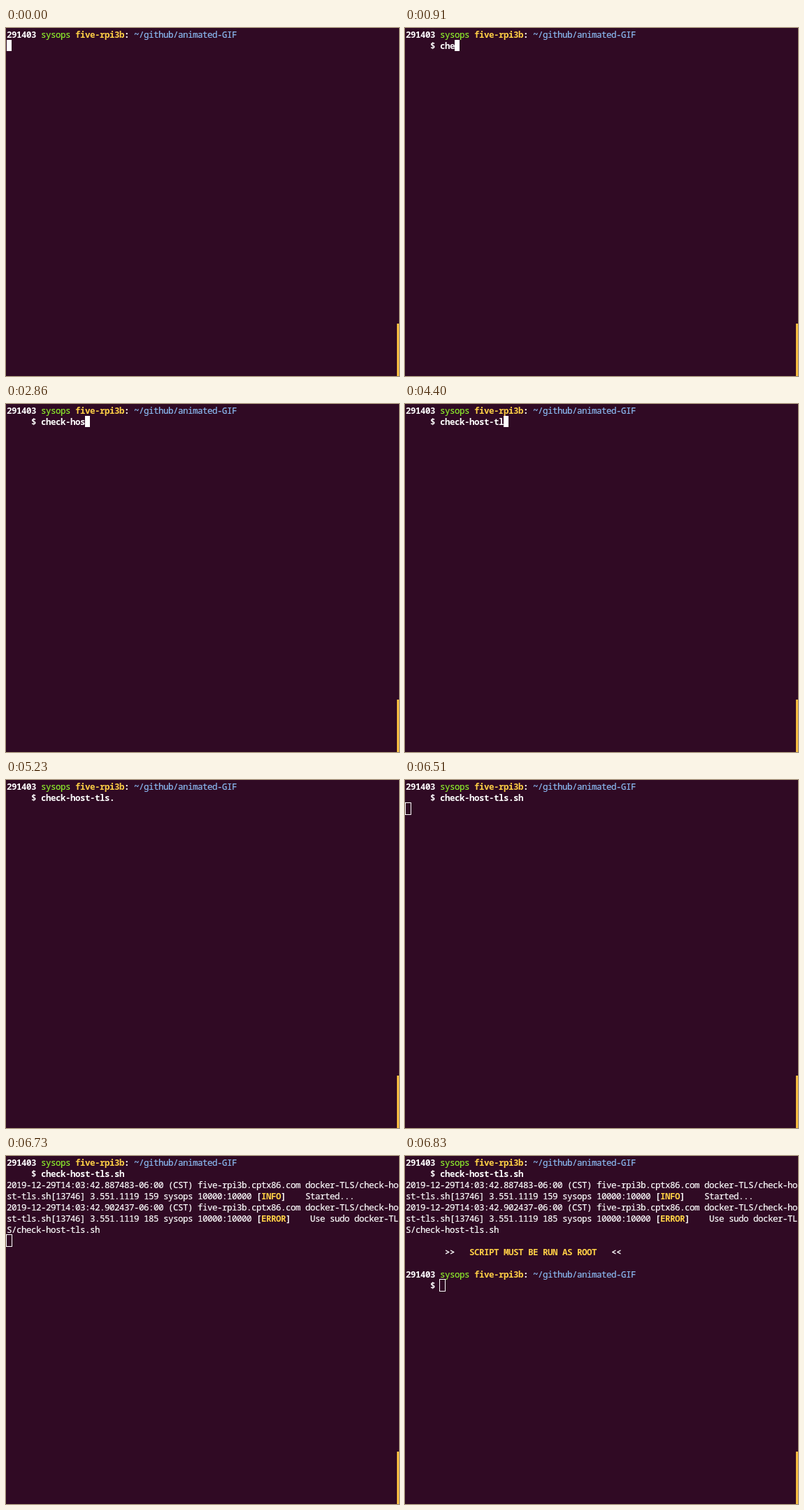
Animation of 562 by 498 pixels, one loop 8 s. Source, as an HTML page:

```html
<!DOCTYPE html>
<html lang="en">
<head>
<meta charset="utf-8">
<title>Terminal session</title>
<style>
  html, body { margin: 0; width: 100%; height: 100%; overflow: hidden; background: #300a24; }
  #term { position: absolute; left: 0; top: 0; width: 562px; height: 498px; overflow: hidden; background: #300a24; }
  .row {
    position: absolute; left: 1px; height: 16px; white-space: pre; color: #fff;
    font: 12.5px/16px "Noto Sans Mono", "DejaVu Sans Mono", monospace;
    letter-spacing: -0.5px; font-variant-ligatures: none;
    -webkit-text-stroke: 0.2px;
  }
  b { font-weight: 700; -webkit-text-stroke: 0; }
  .y { color: #ffd046; }
  .g { color: #8ef02c; }
  .u { color: #8cbcf4; }
  #cursor { position: absolute; box-sizing: border-box; }
  #cursor.block { width: 7px; height: 16px; background: #fff; }
  #cursor.hollow { width: 9px; height: 18px; border: 1px solid #fff; margin: -1px; }
  #bar { position: absolute; left: 559px; top: 423px; width: 3px; height: 75px; background: #f6bc40; }
</style>
</head>
<body>
<div id="term"><div id="rows"></div><div id="cursor"></div><div id="bar"></div></div>
<script>
const LOOP = 8000, COL = 7, ROW = 16;
const command = "check-host-tls.sh";
const user = "sysops";

const head = `<b>291403</b> <span class="g">${user}</span> <b class="y">five-rpi3b</b><b>:</b> <span class="u">~/github/animated-GIF</span>`;
const prompt = text => `<b>     $ ${text}</b>`;
const stamp = micros => `2019-12-29T14:03:42.${micros}-06:00 (CST) five-rpi3b.cptx86.com docker-TLS/check-ho`;
const detail = (line, level, message) =>
  `st-tls.sh[13746] 3.551.1119 ${line} ${user} 10000:10000 <b>[<span class="y">${level}</span>]</b>    ${message}`;

const info = [stamp("887483"), detail(159, "INFO", "Started...")];
const error = [stamp("902437"), detail(185, "ERROR", "Use sudo docker-TL"), "S/check-host-tls.sh"];
const notice = ["", `<b>        &gt;&gt;   <span class="y">SCRIPT MUST BE RUN AS ROOT</span>   &lt;&lt;</b>`, ""];

// One entry per key press: [time, cursor visible]
const keys = [
  [500, 0], [710, 1], [910, 1], [1160, 0], [1350, 1], [2020, 1], [2440, 0], [2690, 1], [2860, 1],
  [3210, 0], [3740, 0], [4150, 0], [4400, 1], [4760, 1], [5230, 0], [5570, 1], [5780, 1]
];

const entered = [head, prompt(command)];
const steps = [
  { at: 0, rows: [head], cursor: ["block", 0, 1] },
  ...keys.map(([at, on], i) => ({
    at,
    rows: [head, prompt(command.slice(0, i + 1))],
    cursor: [on ? "block" : "", 8 + i, 1]
  })),
  { at: 6510, rows: entered, cursor: ["hollow", 0, 2] },
  { at: 6630, rows: [...entered, ...info], cursor: ["hollow", 0, 4] },
  { at: 6730, rows: [...entered, ...info, ...error], cursor: ["hollow", 0, 7] },
  { at: 6830, rows: [...entered, ...info, ...error, ...notice, head, prompt("")], cursor: ["hollow", 7, 11] }
];

const rowsEl = document.getElementById("rows");
const cursorEl = document.getElementById("cursor");
let shown = null;

function show(step) {
  rowsEl.innerHTML = step.rows
    .map((html, i) => `<div class="row" style="top:${2 + i * ROW}px">${html}</div>`)
    .join("");
  const [kind, col, row] = step.cursor;
  cursorEl.className = kind;
  cursorEl.style.left = 1 + col * COL + "px";
  cursorEl.style.top = 1 + row * ROW + "px";
}

const start = performance.now();
function tick() {
  const time = (performance.now() - start) % LOOP;
  const step = steps.findLast(s => s.at <= time);
  if (step !== shown) show(shown = step);
  requestAnimationFrame(tick);
}
tick();
</script>
</body>
</html>
```
